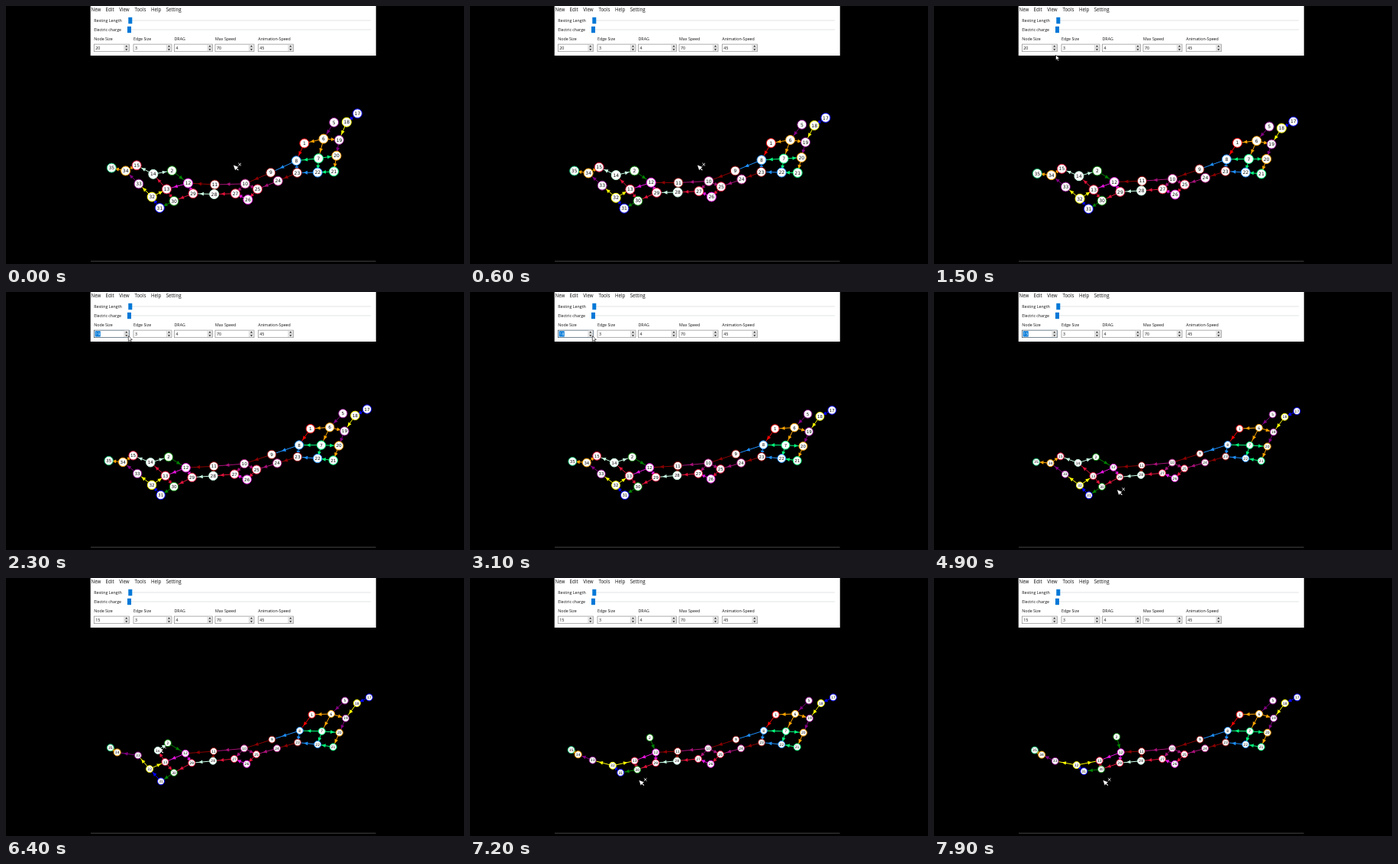
These frames come from a looping animation (600 px wide and 338 px high, 8000 ms). An HTML page:

```html
<!DOCTYPE html>
<html lang="en">
<head>
<meta charset="utf-8">
<title>Graph editor</title>
<style>
html, body { margin: 0; width: 100%; height: 100%; overflow: hidden; background: #000; }
svg { display: block; width: 100vw; height: 100vh; font-family: "Open Sans", "Noto Sans", sans-serif; }
#nodes text { font-family: "DejaVu Sans", sans-serif; text-anchor: middle; fill: #111; }
</style>
</head>
<body>
<svg viewBox="0 0 600 338">
  <rect width="600" height="338"/>
  <path d="M111 334.3H484.5" stroke="#555" stroke-width=".8"/>
  <g id="edges"></g>
  <g id="nodes"></g>
  <rect x="110.7" width="374" height="65" fill="#fff"/>
  <g id="panel"></g>
  <g id="pointer">
    <path id="plainArrow" d="M0 0V7L1.7 5.4 2.8 8 4 7.5 2.9 5H5Z" fill="#fff" stroke="#000" stroke-width=".6"/>
    <g id="deleteArrow">
      <path d="M0 0L6.5 2.6 4.3 3.9 6.8 6.2 6 7 3.6 4.8 2.3 6.8Z" fill="#fff"/>
      <path d="M6.4-2.7l3.6 3.6m0-3.6l-3.6 3.6" stroke="#fff" stroke-width=".9"/>
    </g>
  </g>
</svg>
<script>
const LOOP = 8000, STEP = 100;
const removedAt = { 15: 5600, 14: 6500 };
const FIRST_CLICK = 2000, CLICK_EVERY = 600;

const $ = id => document.getElementById(id);
function set(el, attrs) {
  for (const k in attrs) el.setAttribute(k, attrs[k]);
}
function add(parent, tag, attrs, text) {
  const el = document.createElementNS("http://www.w3.org/2000/svg", tag);
  set(el, attrs);
  if (text !== undefined) el.textContent = text;
  return parent.appendChild(el);
}
const show = (el, on) => set(el, { visibility: on ? "visible" : "hidden" });
const clamp = (v, lo, hi) => Math.min(hi, Math.max(lo, v));
const mix = (a, b, k) => a + (b - a) * k;
const mixPoint = (p, q, k) => [mix(p[0], q[0], k), mix(p[1], q[1], k)];
const settle = (t, start, tau) => t <= start ? 0 : 1 - Math.exp((start - t) / tau);
const range = (a, b) => Array.from({ length: b - a + 1 }, (_, i) => a + i);

// Anchor nodes of the two chains; ids in between are spaced evenly along them.
const chains = [range(5, 15), range(17, 35)];
const ids = [1, 2, ...chains.flat()];
const rest = {
  1: [400.6, 179], 2: [212, 216.3],
  5: [444, 160.6], 6: [426, 178], 7: [413.8, 200.8], 8: [384.8, 200], 10: [312, 223.3],
  11: [272, 227], 12: [235, 229.8], 13: [208.5, 241], 14: [188.5, 224], 15: [165.6, 215.5],
  17: [475.8, 156.4], 18: [459.8, 164], 19: [445, 183.8], 21: [428.6, 221.4], 22: [408.2, 218],
  23: [382, 215.5], 25: [328, 231], 26: [315.4, 243.8], 27: [299, 237], 29: [243.3, 242.3],
  30: [220, 255], 31: [203, 266.4], 32: [191, 253.5], 34: [152.4, 224.4], 35: [133.8, 223]
};
const without15 = { ...rest, 14: [199.5, 226], 32: [188, 250], 33: [173, 232], 34: [145.3, 228.7], 35: [137, 222.3] };
const without14 = {
  ...without15, 2: [240, 207.8], 12: [245, 228.2], 13: [217, 239.2], 30: [219, 250.4],
  31: [196.2, 252.8], 32: [186.7, 245], 33: [158.3, 240], 34: [141, 231.7], 35: [131.8, 225.7]
};
function place(pose, id) {
  if (pose[id]) return pose[id];
  let a = id, b = id;
  while (!pose[a]) a--;
  while (!pose[b]) b++;
  return mixPoint(pose[a], pose[b], (id - a) / (b - a));
}

// Drift towards rest: the chain sags in the middle while both ends swing round.
const sag = [[133, 11], [213, .5], [272, -7], [318, -10], [409, 0], [476, 15.6]];
function drift([x, y]) {
  const i = clamp(sag.findIndex(p => p[0] > x), 1, sag.length - 1);
  const [x0, d0] = sag[i - 1], [x1, d1] = sag[i];
  const dx = x < 250 ? .14 * (y - 255) : Math.max(-1.5, .25 * (218 - y));
  return [dx, mix(d0, d1, (x - x0) / (x1 - x0))];
}
function nodeAt(id, t) {
  const start = place(rest, id), [dx, dy] = drift(start);
  const left = Math.exp(-t / 1350);
  let p = [start[0] - dx * left, start[1] - dy * left];
  p = mixPoint(p, place(without15, id), settle(t, removedAt[15], 280));
  return mixPoint(p, place(without14, id), settle(t, removedAt[14], 380));
}
const alive = (id, t) => !(t >= removedAt[id]);

const palette = {
  "#f00": [1], "#e0123a": [13, 15, 25, 27, 29], "#008000": [2, 30], "#800080": [5, 19, 33],
  "#ffa500": [6, 20, 34], "#00ff7f": [7, 21], "#1e90ff": [8, 22], "#8b0000": [9, 11, 23],
  "#a8127a": [10, 24], "#e815e0": [12, 26], "#c8ffe4": [14, 28], "#0000ff": [17, 31],
  "#ffff00": [18, 32], "#10c070": [35]
};
const colorOf = id => Object.keys(palette).find(c => palette[c].includes(id));

const rungs = { 1: [8], 2: [12], 6: [1, 19], 7: [20, 22], 8: [23], 10: [25, 27], 11: [28], 12: [29], 13: [30], 14: [2], 32: [13], 34: [15] };
const pairs = chains.flatMap(c => c.slice(1).map(id => [id - 1, id]));
for (const from in rungs) for (const to of rungs[from]) pairs.push([+from, to]);

const edges = pairs.map(([from, to]) => ({
  from, to,
  line: add($("edges"), "path", { stroke: colorOf(from), "stroke-width": 1 }),
  head: add($("edges"), "path", { d: "M5 0L-.2-2.4V2.4Z", fill: colorOf(from) })
}));
const nodes = ids.map(id => {
  const g = add($("nodes"), "g", {});
  return {
    id, g,
    ring: add(g, "circle", { fill: "#fff", stroke: colorOf(id), "stroke-width": 1 }),
    label: add(g, "text", {}, id)
  };
});

const panel = $("panel");
const write = (x, y, text, size = 5.3) => add(panel, "text", { x, y, "font-size": size, fill: "#111" }, text);

function slider(label, y, handleX) {
  write(115.3, y + 2.1, label);
  add(panel, "rect", { x: 160, y: y - .6, width: 318, height: 1.1, fill: "#e4e6e8" });
  add(panel, "rect", { x: handleX, y: y - 4.2, width: 5, height: 8.4, fill: "#0078d7" });
}
function spinBox(label, x, width, value) {
  write(x, 44.7, label);
  const frame = add(panel, "rect", { x, y: 50.1, width, height: 9.6, fill: "#fff", stroke: "#8a8a8a", "stroke-width": .7 });
  const bx = x + width - 6.5;
  add(panel, "path", { d: `M${bx} 50.5h6v4h-6zm0 4.6h6v4h-6z`, fill: "#eee", stroke: "#b5b5b5", "stroke-width": .4 });
  add(panel, "path", { d: `M${bx + 1.4} 53.6l1.6-2 1.6 2zm0 2.7l1.6 2 1.6-2z`, fill: "#222" });
  const mark = add(panel, "rect", { x: x + 1.4, y: 51.3, width: 7, height: 7.2, fill: "#0078d7" });
  show(mark, false);
  return { frame, mark, text: write(x + 2, 56.9, value) };
}

[["New", 111.6], ["Edit", 130.6], ["View", 148.2], ["Tools", 168.4], ["Help", 190], ["Setting", 209.7]]
  .forEach(([name, x]) => write(x, 6.8, name, 6.2));
slider("Resting Length", 19, 160.3);
slider("Electric charge", 31, 159);
const sizeBox = spinBox("Node Size", 115.3, 46, 20);
spinBox("Edge Size", 167, 50, 3);
spinBox("DRAG", 220.5, 50, 4);
spinBox("Max Speed", 274, 51, 70);
spinBox("Animation-Speed", 330.3, 46, 45);

// Pointer stops: [arrival time, x, y]; every move takes the same time.
const MOVE = 500;
const stops = [
  [0, 298, 208.5], [1450, 159.5, 64], [2000, 160.3, 57.5], [4900, 240, 259.3],
  [5500, 164, 214], [6300, 199.5, 222.5], [7100, 221.5, 265]
];
const pointerAt = t => stops.reduce((p, [time, x, y]) => {
  const u = clamp((t - time) / MOVE + 1, 0, 1);
  return mixPoint(p, [x, y], u * u * (3 - 2 * u));
}, [0, 0]);

function render(t) {
  const clicks = clamp(Math.floor((t - FIRST_CLICK) / CLICK_EVERY) + 1, 0, 5);
  const size = 20 - clicks;
  const pos = {};
  for (const { id, g, ring, label } of nodes) {
    const [x, y] = pos[id] = nodeAt(id, t);
    show(g, alive(id, t));
    set(g, { transform: `translate(${x} ${y})` });
    set(ring, { r: size * .3 });
    set(label, { y: size * .108, "font-size": size * .3 });
  }
  for (const { from, to, line, head } of edges) {
    const [x1, y1] = pos[from], [x2, y2] = pos[to];
    const on = alive(from, t) && alive(to, t);
    show(line, on);
    show(head, on);
    set(line, { d: `M${x1} ${y1}L${x2} ${y2}` });
    const angle = Math.atan2(y2 - y1, x2 - x1) * 180 / Math.PI;
    set(head, { transform: `translate(${(x1 + x2) / 2} ${(y1 + y2) / 2}) rotate(${angle})` });
  }

  const focused = clicks > 0 && t < removedAt[15];
  sizeBox.text.textContent = size;
  set(sizeBox.text, { fill: focused ? "#fff" : "#111" });
  set(sizeBox.frame, { stroke: focused ? "#334a5c" : "#8a8a8a" });
  show(sizeBox.mark, focused);

  const [px, py] = pointerAt(t);
  set($("pointer"), { transform: `translate(${px} ${py})` });
  show($("plainArrow"), py <= 66);
  show($("deleteArrow"), py > 66);
}

const began = performance.now();
function tick() {
  const t = (performance.now() - began) % LOOP;
  render(Math.floor(t / STEP) * STEP);
  requestAnimationFrame(tick);
}
tick();
</script>
</body>
</html>
```
